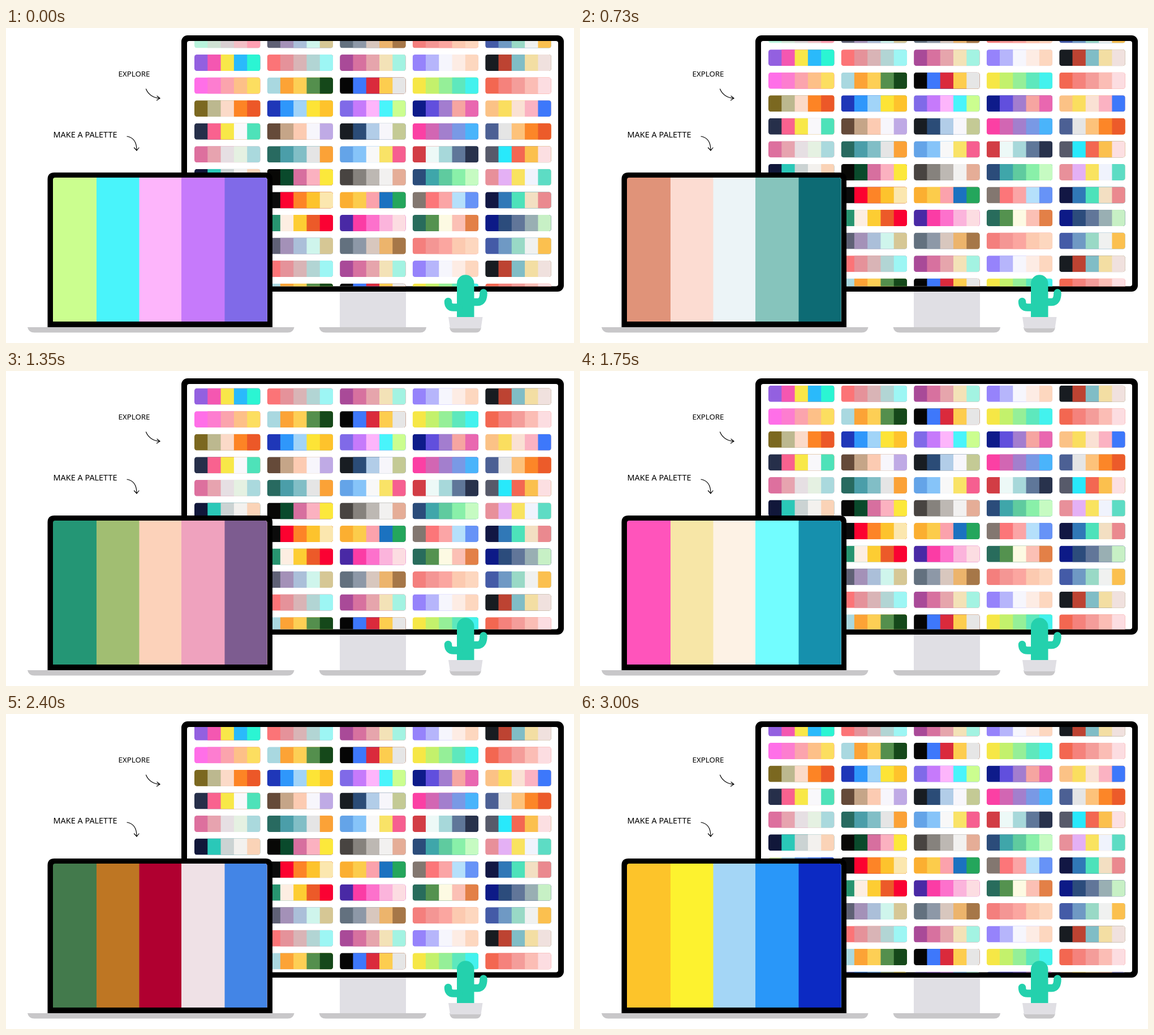
Write an HTML page that moves like this. It is 1004 by 558 pixels and loops after 3060 ms.

```html
<!DOCTYPE html>
<html lang="en">
<head>
<meta charset="utf-8">
<title>Colour palettes</title>
<style>
  html, body { margin: 0; width: 100%; height: 100%; overflow: hidden; background: #fff; }
  svg { display: block; width: 100%; height: 100%; }
  text {
    font: 300 28px "Noto Sans", "Open Sans", sans-serif;
    font-stretch: extra-condensed;
    text-anchor: middle;
    dominant-baseline: central;
  }
  .arrow { fill: none; stroke: #000; stroke-width: 1.2; stroke-linecap: round; }
  .light { fill: #e0dfe4; }
  .dark { fill: #c8c7c9; }
  .arm { fill: none; stroke: #24d1ad; stroke-width: 13.5; stroke-linecap: round; }
</style>
</head>
<body>
<svg viewBox="0 0 1004 558">
  <defs>
    <clipPath id="card"><rect width="116.5" height="29" rx="4.5"/></clipPath>
    <clipPath id="monitorScreen"><rect x="320" y="23" width="656" height="434.5" rx="4"/></clipPath>
    <clipPath id="laptopScreen"><path d="M83 520V269Q83 265 87 265H457.5Q461.5 265 461.5 269V520Z"/></clipPath>
  </defs>

  <text x="226.5" y="81" data-room="56">EXPLORE</text>
  <path class="arrow" d="M247.5 108C252 119 262 124 272 124.5M267 120.5L272 124.5L266.5 128"/>
  <text x="140" y="188.5" data-room="113">MAKE A PALETTE</text>
  <path class="arrow" d="M214 192C226 194 231 204 231 216.500M226.500 212L231 217L235 212"/>

  <rect class="light" x="590" y="460" width="117" height="70"/>
  <path class="dark" d="M553.500 530H743Q742 539.500 732 539.500H565Q555 539.500 553.500 530Z"/>
  <rect x="310" y="13" width="676" height="454" rx="11"/>
  <g clip-path="url(#monitorScreen)">
    <rect x="320" y="23" width="656" height="435" fill="#fff"/>
    <g id="gallery"></g>
  </g>

  <path d="M73.500 530V268Q73.500 256 85.500 256H459Q471 256 471 268V530Z"/>
  <g id="stripes" clip-path="url(#laptopScreen)"></g>
  <path class="dark" d="M38 530H509.500Q508 539.500 498 539.500H50Q40 539.500 38 530Z"/>

  <path fill="#24d1ad" d="M797 513V452.500A15.250 15.250 0 0 1 827.500 452.500V513Z"/>
  <path class="arm" d="M800 495H791Q781.500 495 781.500 484.500M825 485.500H834Q844 485.500 844 469"/>
  <path class="dark" d="M784 530H840Q839 539.500 831 539.500H793Q785 539.500 784 530Z"/>
  <path class="light" d="M782 512H842.500L839.500 532H785Z"/>
</svg>

<script>
const LOOP = 3060;
const SCROLL_SPEED = 0.0122;   // px per ms
const ROW_PITCH = 40.56;
const ROW_COUNT = 13;

// One column of the gallery per block, one palette per line; rows repeat.
const columns = [
  `b8f3dc cfe2d4 d9cfd2 f3bfc6 ff9fb2
   9360e0 f457b1 f8e749 2abafb 2bf5d3
   ff6fe8 fd7dd0 fba4ad fdc088 fcde60
   7b6820 bcb88f fbdac8 fd8425 ec5828
   262f4a f9628f f8e848 f9f8fb 4ee2b9
   dd709e e7a3af e6dfe3 e5f1e2 aad9dd
   11173a 2ac8b8 cbd3d3 f3f1ee fad3b7
   d5f0b0 a8d0e0 6a9ae8 4a7ae0 2f50c8`,
  `5f6175 a491b8 abbfd9 cff5ec d6c795
   fc7477 e5929a d9b4b6 b2d5d4 9df6f4
   a9d8e0 fca336 fdcf55 548f4d 15481a
   1f37b8 2f97fb a1d4f8 fde436 fec32c
   654a39 c5a588 fccbb2 f7f6fc bfaae5
   286a60 4b9ea9 81bec6 e5e5e5 fba237
   080806 0a4a2c d76f9f fbb1c0 fce83b
   0b0b0b fc0230 fd8427 fdc32d fbe7af
   27946f fdeee2 fdcd33 ec5a29 fa0233`,
  `63717f 8d98a7 d8c7be ecb46c a67748
   a94a98 d7719f e6a5ac f3e2b7 a3f3e2
   050505 3e78fb da2a3c fdcd4f e6e6e6
   806ae8 c67afb fdb5fb 49f4fb cbfe8f
   181d22 2b4c77 b2cde8 f7f6fb c4ca95
   64a4e8 86c4f9 f8f8f8 f9e367 f65f90
   484441 86827d bdb8b3 f2f1f0 e5ad97
   fbaf31 fccc4b fba2ac 1b72c0 24a65c
   4929a5 fb3ca5 fd71cc fbb4dc fcdde2`,
  `f47f7d f49694 fba6a0 fccab0 fdd7bf
   9683fb b6b5fb f6f6fd fdece4 fdd7bf
   f6e746 c3f16c 95ef98 5ee8bd 43f2ee
   0e1b8a 614fdd a37dcf f6a5a1 e967b0
   fb40a4 d266b3 a37fcd 7999e5 4ab4fb
   d23d45 edf9f7 a7d8da 5f7799 28324c
   2b4c7a 3fa6aa 5fcb9f 89f0a9 c6fbc2
   837770 fc7679 fba5a6 b5e0fb 6793f7
   286c5c 54924f fdfae3 fbc0b5 e38047`,
  `445ba7 6f99c4 99d9c6 f0f1f0 fbc04f
   181c21 bd4332 80bdc6 f3dea3 f0e1de
   f36751 f5827c f49d9a fbbdb5 fcdde1
   fbc286 fade5f fae1d4 fbb2c2 3d78fb
   4c6094 e5e5e5 fdc27a fc8628 ec5b2a
   575a6a 28e9fb f36752 fbc04e fcdfe2
   e8909a e4b0f5 f9e35f f0f3fd 5ddcc4
   121744 3078b7 4de2ba f3dfc2 ea898f
   0d1a87 2c4c7c 617699 99afb3 c7f0c5`
].map(parsePalettes);

const laptopPalettes = parsePalettes(
  `cbfe8f 49f4fb fdb5fb c67afb 806ae8
   e09379 fcdcd2 ecf4f7 86c4bc 0d6b74
   1e9873 9fbd71 fcd1b9 f29fbc 805b8f
   ff54bb f7e6a7 fdf2e5 72fdff 1690ad
   437a4c be7623 b00030 efe1e6 4385e6
   fdc42a fdf22f a4d6f6 2997f9 0c2ac3`);
const FIRST_FADE = 130, FADE_PERIOD = 600, FADE_LENGTH = 200;

function parsePalettes(block) {
  return block.split("\n").map(line => line.trim().split(" "));
}

function add(parent, tag, attributes) {
  const node = document.createElementNS("http://www.w3.org/2000/svg", tag);
  for (const name in attributes) node.setAttribute(name, attributes[name]);
  return parent.appendChild(node);
}

function mix(from, to, amount) {
  const channel = (hex, i) => parseInt(hex.slice(2 * i, 2 * i + 2), 16);
  const rgb = [0, 1, 2].map(i => {
    const start = channel(from, i);
    return Math.round(start + (channel(to, i) - start) * amount);
  });
  return `rgb(${rgb})`;
}

const gallery = document.getElementById("gallery");
columns.forEach((palettes, column) => {
  for (let row = 0; row < ROW_COUNT; row++) {
    const palette = palettes[row % 9];
    if (!palette) continue;
    const x = 333 + column * 128.55, y = 6.5 + row * ROW_PITCH;
    const card = add(gallery, "g", { transform: `translate(${x} ${y})`, "clip-path": "url(#card)" });
    palette.forEach((color, i) =>
      add(card, "rect", { x: i * 23.3, width: 116.5 - i * 23.3, height: 29, fill: "#" + color }));
  }
});

const stripes = [83, 160, 235.5, 310, 386.5].map(x =>
  add(document.getElementById("stripes"), "rect", { x, y: 265, width: 462 - x, height: 255 }));

// Largest font size at which each label fits its room.
for (const label of document.querySelectorAll("text")) {
  const size = Math.min(28, 28 * label.dataset.room / label.getComputedTextLength());
  label.style.fontSize = size + "px";
}

function draw(now) {
  const time = now % LOOP;
  gallery.setAttribute("transform", `translate(0 ${-time * SCROLL_SPEED})`);

  const step = Math.min(4, Math.max(0, Math.floor((time - FIRST_FADE) / FADE_PERIOD)));
  const elapsed = time - FIRST_FADE - step * FADE_PERIOD;
  const progress = Math.min(1, Math.max(0, elapsed / FADE_LENGTH));
  const eased = (1 - Math.cos(Math.PI * progress)) / 2;
  stripes.forEach((stripe, i) =>
    stripe.setAttribute("fill", mix(laptopPalettes[step][i], laptopPalettes[step + 1][i], eased)));
}

const startTime = performance.now();
function tick() {
  draw(performance.now() - startTime);
  requestAnimationFrame(tick);
}
tick();
</script>
</body>
</html>
```
